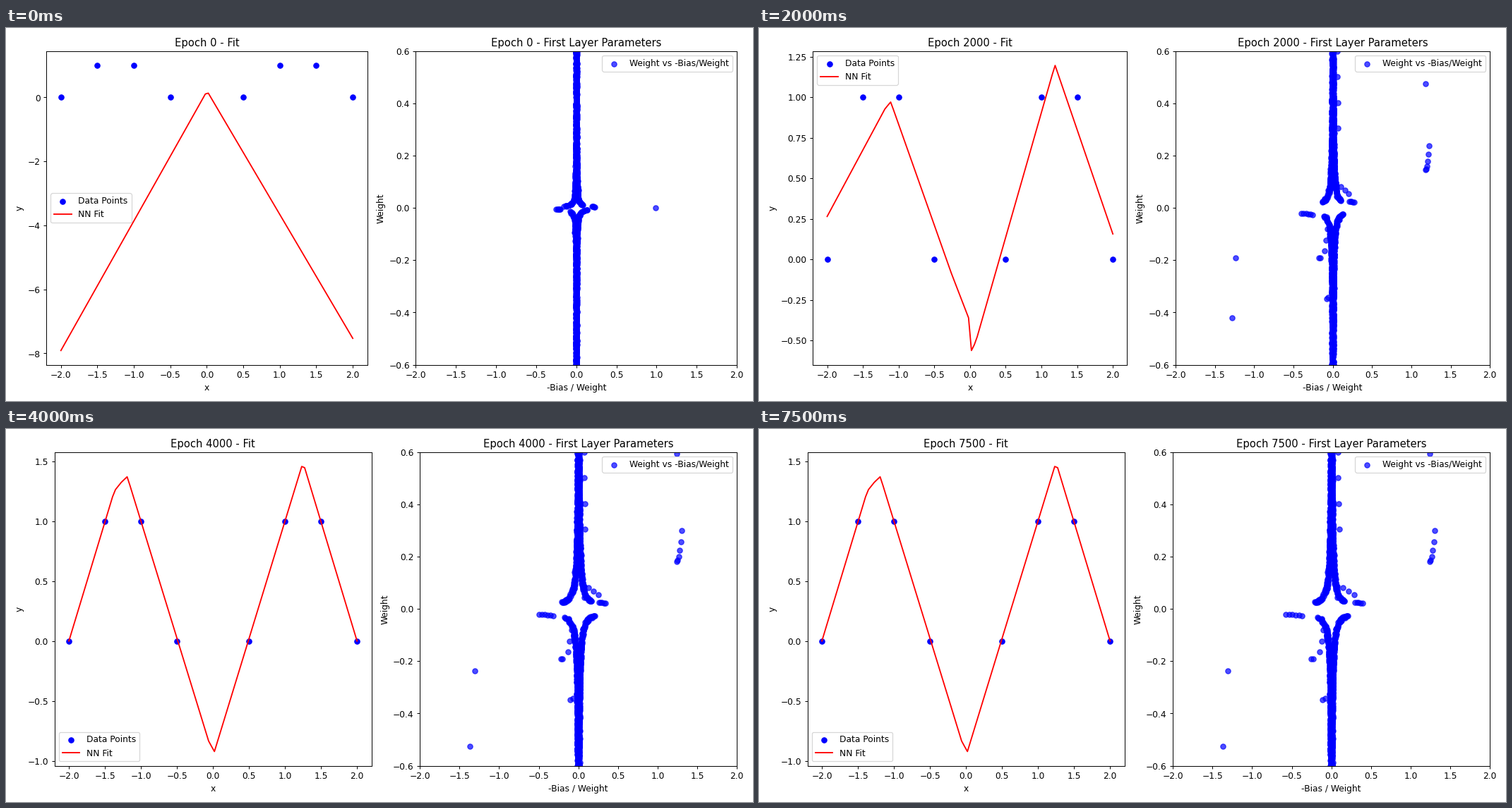
Recreate the animation shown at these times as a matplotlib script. Size 1058 by 529 pixels, loop 8 s.

```python
import numpy as np
import matplotlib.pyplot as plt
from matplotlib.animation import FuncAnimation

FRAMES, INTERVAL, EPOCH_STEP = 16, 500, 500
DPI, LAYOUT_DPI = 88.17, 100
GRID = np.linspace(-2, 2, 100)
DATA_X = np.array([-2, -1.5, -1, -0.5, 0.5, 1, 1.5, 2])
DATA_Y = (abs(abs(DATA_X) - 1.25) < 0.5).astype(int)


def curve(*corners):
    """Piecewise linear curve through (x, y) corners."""
    return np.interp(GRID, *zip(*corners))


def blend(epoch, keys):
    """Ease out from one key of {epoch: value} to the next."""
    times = list(keys)
    i = int(np.clip(np.searchsorted(times, epoch, "right") - 1, 0, len(times) - 2))
    start, end = times[i], times[i + 1]
    f = 1 - (1 - np.clip((epoch - start) / (end - start), 0, 1)) ** 2
    return keys[start] * (1 - f) + keys[end] * f


early = curve((-2, .49), (-1, .523), (-.22, .467), (-.06, .446), (-.02, .42),
              (.02, .304), (.06, .309), (1.01, .588), (2, .451))
middle = curve((-2, .265), (-1.19, .93), (-1.11, .972), (-.26, -.087),
               (-.02, -.361), (.02, -.563), (.08, -.51), (1.19, 1.2), (2, .157))
final = curve((-2, 0), (-1.37, 1.25), (-1.27, 1.325), (-1.19, 1.37),
              (-.06, -.835), (.02, -.922), (1.25, 1.49), (2, 0))
FITS = {
    0: curve((-2, -7.91), (-.02, .11), (.02, .135), (2, -7.53)),
    500: .47 + (early - .47) / 2,
    1000: early,
    2000: middle,
    3000: final,
    6000: final,
    6500: final + .03 * np.minimum(GRID, 0),  # brief instability on the left
    7000: final,
}

# Most neurons: random weight, bias of equal size and random sign.
rng = np.random.default_rng(4)
COUNT = 1250
sign = rng.choice([-1, 1], COUNT)
size = rng.uniform(.006, .62, COUNT)
side = np.where(size < .012, -sign, rng.choice([-1, 1], COUNT))
spread = rng.normal(1, .1, COUNT)
jitter = rng.normal(0, .003, COUNT)


def column(epoch):
    bias = blend(epoch, {0: .001, 1000: .0018, 2000: .003, 3000: .005})
    push = blend(epoch, {0: 0, 1000: .012, 3000: .018})
    x = side * bias * spread / (size + push) + jitter
    return x, sign * (size + push)


def row(start, end, count):
    return np.linspace(start, end, count).T


# Strays: rows of neurons between two (x, weight) ends.
STRAY_X, STRAY_W = np.hstack([
    row((.26, .026), (.34, .022), 5),
    row((.13, .082), (.25, .056), 3),
    row((.07, .6), (.085, .305), 4),
    row((-.32, -.025), (-.5, -.02), 6),
    row((-.09, -.08), (-.13, -.165), 3),
    row((-.2, -.19), (-.22, -.19), 2),
    row((-.07, -.342), (-.1, -.348), 2),
])


def strays(epoch):
    start_w = np.where(abs(STRAY_W) < .03, .2, 1) * STRAY_W
    x = blend(epoch, {0: .001 / start_w, 1000: .65 * STRAY_X, 2000: .8 * STRAY_X,
                      3000: STRAY_X, 6000: STRAY_X, 7500: 1.15 * STRAY_X})
    return x, blend(epoch, {0: start_w, 1000: STRAY_W})


# Far neurons leave x = +-1 in a fan on the right and a pair on the left.
fan = np.linspace(0, 1, 6)
FAR_X = np.hstack([1.24 + .065 * fan, 1.245, -1.31, -1.37])
FAR_W = np.hstack([.182 + .117 * fan ** 2, .594, -.238, -.525])


def far(epoch):
    if epoch == 0:
        return np.array([[.99], [0]])
    drift = blend(epoch, {1000: 0, 2000: .75, 3000: 1})
    growth = blend(epoch, {0: 0, 1000: .3, 2000: .8, 3000: 1})
    home = np.sign(FAR_X)
    return home + (FAR_X - home) * drift, FAR_W * growth


fig, (fit_ax, param_ax) = plt.subplots(1, 2, figsize=(12, 6), dpi=DPI)


def arrange():
    """Lay out at a higher resolution, so text rounding does not move the axes."""
    fig.dpi = LAYOUT_DPI
    fig.subplots_adjust(left=.125, right=.9, bottom=.11, top=.88, wspace=.2)
    fig.tight_layout()
    fig.dpi = DPI


def draw(frame):
    epoch = frame * EPOCH_STEP

    fit_ax.clear()
    fit_ax.scatter(DATA_X, DATA_Y, color="blue", label="Data Points")
    fit_ax.plot(GRID, blend(epoch, FITS), color="red", label="NN Fit")
    fit_ax.set(title=f"Epoch {epoch} - Fit", xlabel="x", ylabel="y")
    fit_ax.legend()

    x, weight = np.hstack([column(epoch), strays(epoch), far(epoch)])
    param_ax.clear()
    param_ax.scatter(x, weight, color="blue", alpha=0.7,
                     label="Weight vs -Bias/Weight")
    param_ax.set(title=f"Epoch {epoch} - First Layer Parameters",
                 xlabel="-Bias / Weight", ylabel="Weight",
                 xlim=(-2, 2), ylim=(-0.6, 0.6))
    param_ax.legend(loc="upper right")

    arrange()
    return []


anim = FuncAnimation(fig, draw, frames=FRAMES, interval=INTERVAL,
                     init_func=lambda: [], repeat=True, repeat_delay=0)
plt.show()
```
